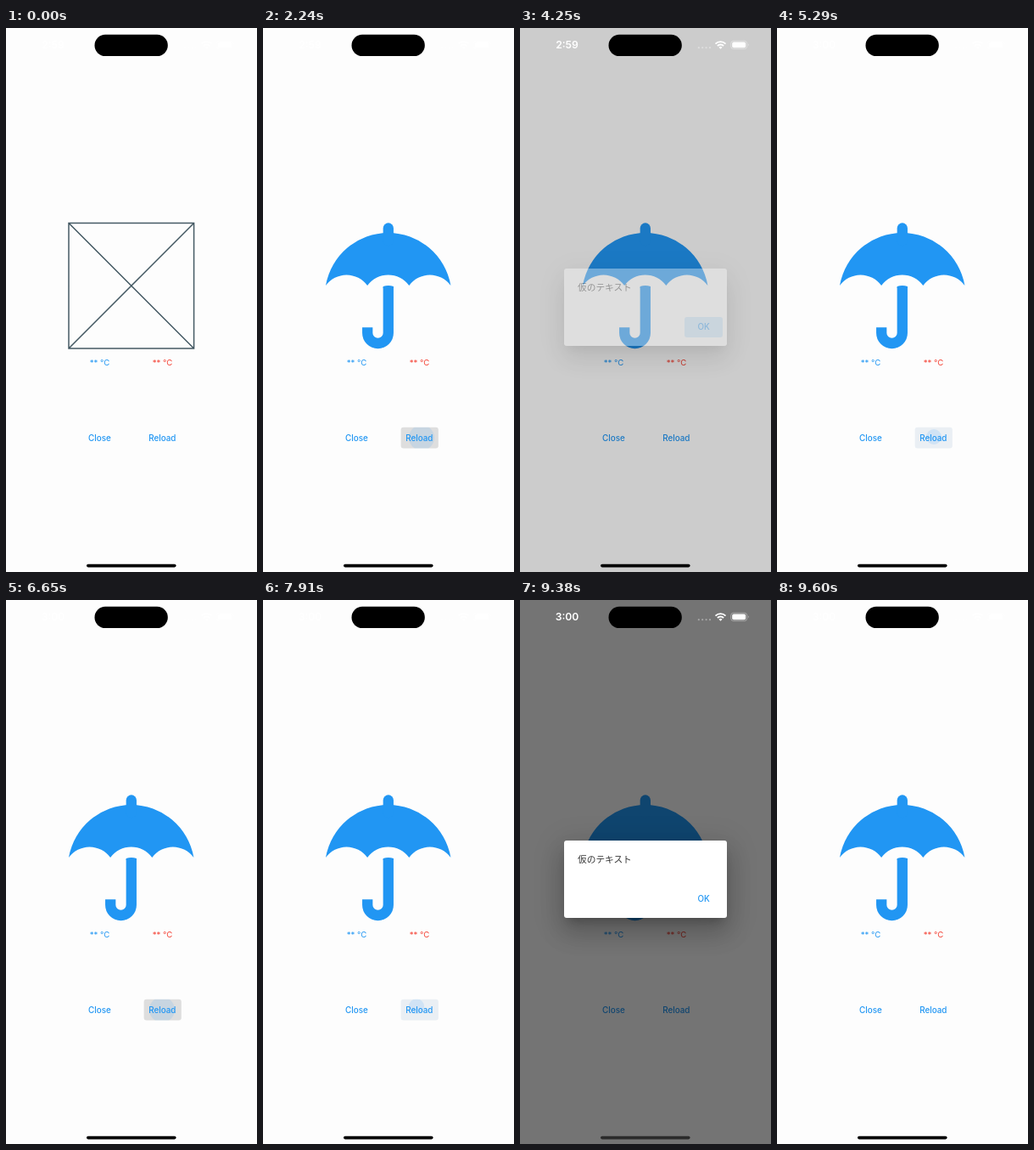
An HTML page for the animation above (9.63 s loop, 296 by 640 pixels).

```html
<!DOCTYPE html>
<html lang="en">
<head>
<meta charset="utf-8">
<title>Weather screen</title>
<style>
  html, body { margin: 0; width: 100%; height: 100%; overflow: hidden; background: #fdfdfd; }
  body { position: relative; font-family: Inter, Roboto, sans-serif; }
  svg, #barrier { position: absolute; left: 0; top: 0; width: 296px; height: 640px; }
  text { font-family: Inter, Roboto, sans-serif; text-anchor: middle; }
  .temp { font-size: 9.6px; }
  .label { font-size: 9.9px; font-weight: 500; fill: #2196f3; }
  #barrier { background: #000; }
  #dialog {
    position: absolute; left: 51.5px; top: 283.3px; width: 192.5px; height: 90.7px;
    background: #fff; border-radius: 3px;
    box-shadow: 0 8px 11px -5px rgba(0,0,0,.2), 0 18px 28px 2px rgba(0,0,0,.14), 0 7px 34px 6px rgba(0,0,0,.12);
  }
  #dialog p {
    position: absolute; left: 16.5px; top: 14px; margin: 0; color: #333; white-space: nowrap;
    font: 10.7px/16px "Noto Sans CJK JP", "Noto Sans CJK", sans-serif;
  }
  #ok {
    position: absolute; left: 142.5px; top: 56.7px; width: 45px; height: 24.5px;
    border-radius: 3px; color: #2196f3; text-align: center;
    font-size: 9.8px; font-weight: 500; line-height: 24.5px;
  }
  #ok.pressed { background: rgba(33,150,243,.25); }
</style>
</head>
<body>
<svg viewBox="0 0 296 640">
  <defs>
    <clipPath id="buttonClip"><rect x="162.6" y="469.7" width="44.2" height="24.7" rx="3"/></clipPath>
  </defs>
  <path id="placeholder" d="M74 229.5H221.6V377H74ZL221.6 377M221.6 229.5L74 377"
        fill="none" stroke="#455a64" stroke-width="1.5"/>
  <g id="umbrella" fill="#2196f3">
    <path d="M74 303A74.8 74.8 0 0 1 221.4 303A30.5 30.5 0 0 0 172.3 303A30.5 30.5 0 0 0 123.1 303A30.5 30.5 0 0 0 74 303Z"/>
    <path d="M147.8 235.5V250" stroke="#2196f3" stroke-width="12.3" stroke-linecap="round"/>
    <path d="M141.65 306V304q6.15 -2.2 12.3 0V306Z"/>
    <path d="M147.8 305V358.7a12.3 12.3 0 0 1 -24.6 0V352.3" fill="none" stroke="#2196f3" stroke-width="12.3"/>
  </g>
  <text class="temp" x="110.6" y="397.2" fill="#2196f3">** °C</text>
  <text class="temp" x="184.5" y="397.2" fill="#f44336">** °C</text>
  <g id="press" clip-path="url(#buttonClip)">
    <rect id="fill" x="162" y="469" width="46" height="26"/>
    <circle id="splash" fill="#2196f3"/>
  </g>
  <text class="label" x="110.5" y="485.6">Close</text>
  <text class="label" x="184.3" y="485.6">Reload</text>
</svg>

<div id="barrier"></div>
<div id="dialog"><p>仮のテキスト</p><div id="ok">OK</div></div>

<svg viewBox="0 0 296 640" fill="#fff">
  <text id="clock" x="55.5" y="24.4" font-size="12.2" font-weight="600">2:59</text>
  <g opacity=".35">
    <circle cx="210.8" cy="23.2" r="1.1"/><circle cx="215.2" cy="23.2" r="1.1"/>
    <circle cx="219.6" cy="23.2" r="1.1"/><circle cx="224" cy="23.2" r="1.1"/>
  </g>
  <path d="M230.5 18.6a8.5 8.5 0 0 1 12 0M232.9 21a5.1 5.1 0 0 1 7.2 0" fill="none" stroke="#fff" stroke-width="1.8"/>
  <path d="M236.5 24.7l-2 -2a2.85 2.85 0 0 1 4 0Z"/>
  <rect x="248.7" y="15.2" width="19" height="9.4" rx="3" fill="none" stroke="#fff" stroke-width=".8" opacity=".45"/>
  <rect x="250.2" y="16.6" width="16" height="6.6" rx="1.8"/>
  <path d="M269 18.3q1.5 1.6 0 3.2Z" opacity=".5"/>
  <rect x="104.5" y="7.8" width="86.3" height="25.3" rx="12.65" fill="#000"/>
  <rect id="home" x="95" y="630.8" width="105.6" height="3.6" rx="1.8"/>
</svg>

<script>
  const LOOP = 9630, STEP = 110;
  const $ = id => document.getElementById(id);

  // [start ms, touch x, touch y]
  const presses = [
    [1240, 185, 482], [2020, 187, 482], [5080, 185, 481], [5850, 184, 482],
    [6430, 184, 482], [6870, 185, 481], [7210, 183, 480], [7800, 181, 478]
  ];
  // one entry per step of a press
  const phases = [
    { fill: '#f1f5f9', r: 0, tint: 0 },
    { fill: '#eaeff4', r: 9, tint: .13 },
    { fill: '#dedede', r: 15, tint: .12 },
    { fill: '#eeeeef', r: 24, tint: .05 }
  ];
  // [ms, dialog opacity], held until the next entry
  const fades = [
    [0, 0], [2350, .4], [2460, .85], [2570, 1], [4150, .8], [4250, .36], [4970, 0],
    [8130, .4], [8240, .85], [8360, 1], [9490, .36], [9600, 0]
  ];

  const latest = (list, t) => list.filter(e => e[0] <= t).pop();
  const show = (id, on) => $(id).setAttribute('visibility', on ? 'visible' : 'hidden');
  const set = (id, attrs) => {
    for (const key in attrs) $(id).setAttribute(key, attrs[key]);
  };

  function drawPress(t) {
    const press = latest(presses, t);
    const phase = press && phases[Math.floor((t - press[0]) / STEP)];
    show('press', phase);
    if (!phase) return;
    set('fill', { fill: phase.fill });
    set('splash', { cx: press[1], cy: press[2], r: phase.r, opacity: phase.tint });
  }

  function draw(t) {
    const reloaded = t >= 1570;
    show('placeholder', !reloaded);
    show('umbrella', reloaded);
    drawPress(t);

    const fade = latest(fades, t)[1];
    $('barrier').style.opacity = .54 * fade;
    $('dialog').style.opacity = fade;
    $('ok').className = (t >= 4040 && t < 4970) || t >= 9490 ? 'pressed' : '';
    $('clock').textContent = t < 5000 ? '2:59' : '3:00';
    set('home', { fill: fade === 1 ? '#2b2b2b' : '#000' });
  }

  const start = performance.now();
  function tick() {
    draw((performance.now() - start) % LOOP);
    requestAnimationFrame(tick);
  }
  draw(0);
  requestAnimationFrame(tick);
</script>
</body>
</html>
```
